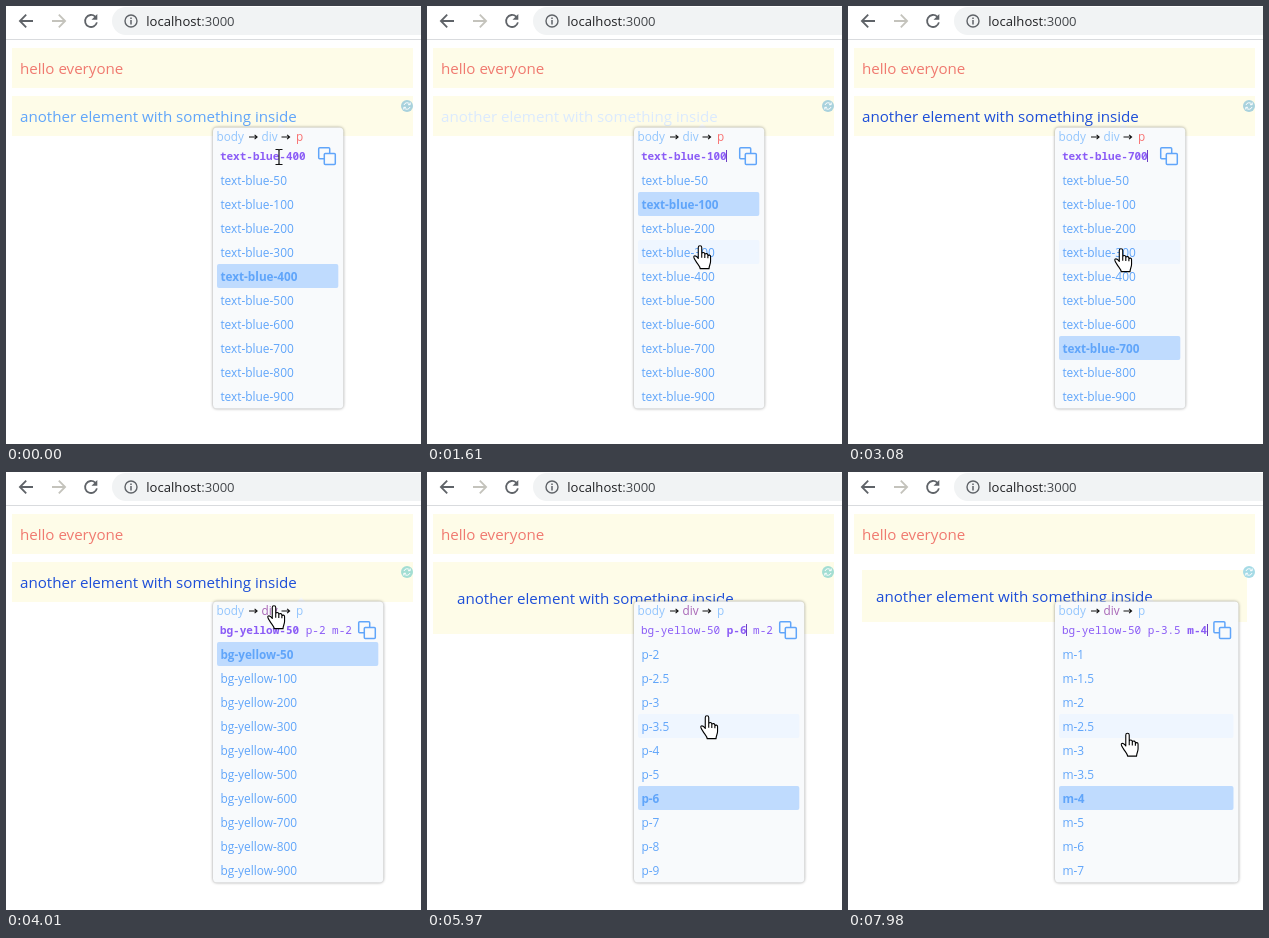
An HTML page that plays this animation: 415x438 px, repeating every 8000 ms.

```html
<!DOCTYPE html>
<html lang="en">
<head>
<meta charset="utf-8">
<title>Class picker</title>
<style>
  html, body { margin: 0; width: 100%; height: 100%; overflow: hidden; background: #fff; }
  svg { display: block; width: 100%; height: 100%; font-family: "Open Sans", "Noto Sans", sans-serif; }
  .copy { font-size: 15.13px; }
  .crumb { font-size: 11.75px; }
  .item { font-size: 11.9px; font-weight: 500; fill: #60a5fa; }
  .mono { font: 11px "Noto Sans Mono", "DejaVu Sans Mono", monospace; fill: #8b5cf6; white-space: pre; }
  .on { font-size: 11.75px; font-weight: 700; }
  .mono .on { font-size: 11px; }
  .line { fill: none; stroke: #5f6368; stroke-width: 1.8; }
  .box { filter: drop-shadow(0 0 1.5px rgba(0, 0, 0, .42)); }
  .hand { fill: #fff; stroke: #000; stroke-width: 1.15; stroke-linejoin: round; }
  .beam { fill: none; stroke: #111; stroke-width: 1.2; }
</style>
</head>
<body>
<svg viewBox="0 0 415 438" xmlns="http://www.w3.org/2000/svg">
  <rect width="415" height="438" fill="#fff"/>

  <!-- toolbar -->
  <path d="M27 15H14M20.2 8.7L13.9 15L20.2 21.3" class="line"/>
  <path d="M46 15H59M52.8 8.7L59.1 15L52.8 21.3" class="line" style="stroke:#c4c3bc"/>
  <path d="M89.2 10.6A6 6 0 1 0 90.9 16.4" class="line"/>
  <path d="M91.3 8V13.8H85.5Z" fill="#5f6368"/>
  <rect x="106" y="1" width="340" height="28" rx="14" fill="#f1f3f4"/>
  <circle cx="125" cy="15" r="6" class="line" style="stroke-width:1.4"/>
  <path d="M125 14V18.4M125 11.4V12.9" class="line" style="stroke-width:1.5"/>
  <text x="140.3" y="20" font-size="13.1" fill="#202124">localhost<tspan fill="#45484c">:3000</tspan></text>
  <path d="M0 33.5H415" stroke="#d9dbde"/>

  <!-- page -->
  <rect x="6" y="42" width="401" height="40" fill="#fefce8"/>
  <text x="13.9" y="68" class="copy" fill="#f07a70">hello everyone</text>
  <rect id="block" fill="#fefce8"/>
  <text id="words" class="copy">another element with something inside</text>
  <circle id="dot" cx="401" cy="100" r="6"/>
  <path d="M398 99A3.2 3.2 0 0 1 403.6 98M404 101A3.2 3.2 0 0 1 398.4 102M404.2 96.5V98.7H402M397.8 103.5V101.3H400"
        fill="none" stroke="#fff" stroke-width="1"/>

  <g id="panel"></g>
  <g id="pointer"></g>
</svg>

<script>
const $ = id => document.getElementById(id);
const LOOP = 8000, LEFT = 207, ROW = 24, ROWS = 10, CHAR = 6.6;
const blues = ['#eff6ff', '#dbeafe', '#bfdbfe', '#93c5fd', '#60a5fa',
               '#3b82f6', '#2563eb', '#1d4ed8', '#1e40af', '#1e3a8a'];

// names of the entries of the colour and spacing scales
const shade = i => i ? i * 100 : 50;
const size = i => i < 2 ? ['0', 'px'][i] : i < 10 ? (i - 1) / 2 : i - 5;

// linear ramps: [start, end, value]
function track(value, ramps, t) {
  for (const [a, b, to] of ramps)
    if (t >= a) value += (to - value) * Math.min(1, (t - a) / (b - a));
  return value;
}
const wheel = (from, ramps, t) => Math.round(track(from, ramps, t));

function stateAt(t) {
  const mode = t < 4010 ? 'text' : t < 5100 ? 'bg' : t < 7120 ? 'p' : 'm';
  const child = mode === 'text', drop = child ? 0 : 8;
  const x = track(273, [[3230, 3690, 268], [4400, 4790, 316], [5180, 5500, 280],
    [6730, 7040, 346], [7200, 7510, 279.5]], t);
  const y = track(151, [[150, 590, 240], [1840, 2070, 243], [3230, 3690, 134], [4400, 4790, 159],
    [5180, 5500, 244], [6730, 7040, 158], [7200, 7510, 261.5]], t);
  const row = Math.floor((y - 162 - drop) / ROW);
  return {
    mode, child, drop, x, y,
    blue: wheel(4, [[680, 910, 7], [1130, 1690, 0], [1760, 2150, 9], [2370, 2680, 0], [2850, 3080, 7]], t),
    pad: wheel(5, [[5500, 5970, 11], [5990, 6110, 13], [6270, 6490, 8]], t),
    gap: wheel(5, [[7540, 7900, 9]], t),
    beam: y > 141 + drop && y < 162 + drop,
    hover: row >= 0 && row < ROWS ? row : -1,
    caret: child ? t >= 740 : t >= 5100
  };
}

const text = (x, y, str, cls, fill) =>
  `<text x="${x}" y="${y}" class="${cls}" ${fill ? `fill="${fill}"` : ''}>${str}</text>`;
const arrow = (x, y) =>
  `<path d="M${x} ${y}h8M${x + 5.6} ${y - 2.2}l2.5 2.2l-2.5 2.2" fill="none" stroke="#111" stroke-width="1.1"/>`;

function panel(s) {
  const { mode, child, drop } = s;
  const classes = child ? ['text-blue-' + shade(s.blue)]
                        : ['bg-yellow-50', 'p-' + size(s.pad), 'm-' + size(s.gap)];
  const active = Math.max(0, ['bg', 'p', 'm'].indexOf(mode));
  const w = (child ? 44.5 : 38.3) + classes.join(' ').length * CHAR;
  const right = LEFT + w, mid = LEFT + w / 2 + 3, top = 121.5 + drop;

  const [prefix, name, chosen] = {
    text: ['text-blue-', shade, s.blue],
    bg: ['bg-yellow-', shade, 0],
    p: ['p-', size, s.pad],
    m: ['m-', size, s.gap]
  }[mode];
  const first = name === size ? Math.max(0, chosen - 6) : 0;

  let out = `<path d="M${mid - 5} ${top + 1}l5 -5l5 5z" fill="#f8fafc"/>
    <rect x="${LEFT}" y="${top}" width="${w}" height="281" rx="4" fill="#f8fafc" class="box"/>`;

  const base = 135 + drop;
  out += text(210.5, base, 'body', 'crumb', '#93c5fd') + arrow(243, base - 4)
    + text(255.5, base, 'div', 'crumb', child ? '#93c5fd' : '#a764b6') + arrow(275.5, base - 4)
    + text(290, base, 'p', 'crumb', child ? '#f87171' : '#93c5fd');

  const spans = classes.map((c, i) => i === active ? `<tspan class="on">${c}</tspan>` : c);
  out += text(213.9, 154 + drop, spans.join(' '), 'mono');
  if (s.caret) {
    const end = classes.slice(0, active + 1).join(' ').length;
    out += `<rect x="${Math.round(213.6 + end * CHAR)}" y="${144 + drop}" width="1" height="12" fill="#6d3fc4"/>`;
  }

  const ix = right - 24.6, iy = 141.8 + drop;
  out += `<g fill="#f8fafc" stroke="#60a5fa" stroke-width="1.5">
    <rect x="${ix}" y="${iy}" width="11" height="11" rx="1"/>
    <rect x="${ix + 5.6}" y="${iy + 5.6}" width="11" height="11" rx="1"/></g>`;

  for (let i = 0; i < ROWS; i++) {
    const y = 162 + drop + i * ROW, picked = first + i === chosen;
    if (picked || i === s.hover)
      out += `<rect x="211" y="${y}" width="${w - 9}" height="${ROW}" rx="2" fill="${picked ? '#bfdbfe' : '#eff6ff'}"/>`;
    out += text(214.4, y + 16.8, prefix + name(first + i), picked ? 'item on' : 'item');
  }
  return out;
}

const hand = `<path class="hand" transform="scale(.96)" d="M-1.8 13V1.6A1.8 1.8 0 0 1 1.8 1.6V8.2
  A1.6 1.6 0 0 1 5 8.6V9.2A1.6 1.6 0 0 1 8.2 9.8V10.4A1.45 1.45 0 0 1 11 11V16C11 19 9.6 20 9.4 23.6H.2
  C0 21 -2.5 19 -4.5 15.5C-6.5 12.5 -7.2 11.5 -6.2 10.6C-5 9.6 -3.2 11 -1.8 13ZM1.8 8V12.2M5 9V12.4M8.2 10V12.8"/>`;
const beam = '<path class="beam" d="M-3.5 -7.5H-1Q0 -7.5 0 -6.5Q0 -7.5 1 -7.5H3.5M0 -7V7M-3.5 7.5H-1Q0 7.5 0 6.5Q0 7.5 1 7.5H3.5"/>';

function set(id, attrs) {
  for (const k in attrs) $(id).setAttribute(k, attrs[k]);
}

let last = '';
function draw(t) {
  const s = stateAt(t), key = JSON.stringify(s);
  if (key === last) return;
  last = key;

  const m = size(s.gap) * 4, p = size(s.pad) * 4;
  const x = m - 2, y = 82 + m;
  set('block', { x, y, width: 417 - 2 * m, height: 24 + 2 * p });
  set('words', { x: x + p, y: y + p + 18, fill: blues[s.blue] });
  set('dot', { fill: s.child ? '#a9d2dd' : s.mode === 'm' ? '#a6dbe6' : '#a3ded3' });
  $('panel').innerHTML = panel(s);
  $('pointer').innerHTML = s.beam ? beam : hand;
  set('pointer', { transform: `translate(${s.x} ${s.y})` });
}

const start = performance.now();
function tick() {
  draw((performance.now() - start) % LOOP);
  requestAnimationFrame(tick);
}
tick();
</script>
</body>
</html>
```
